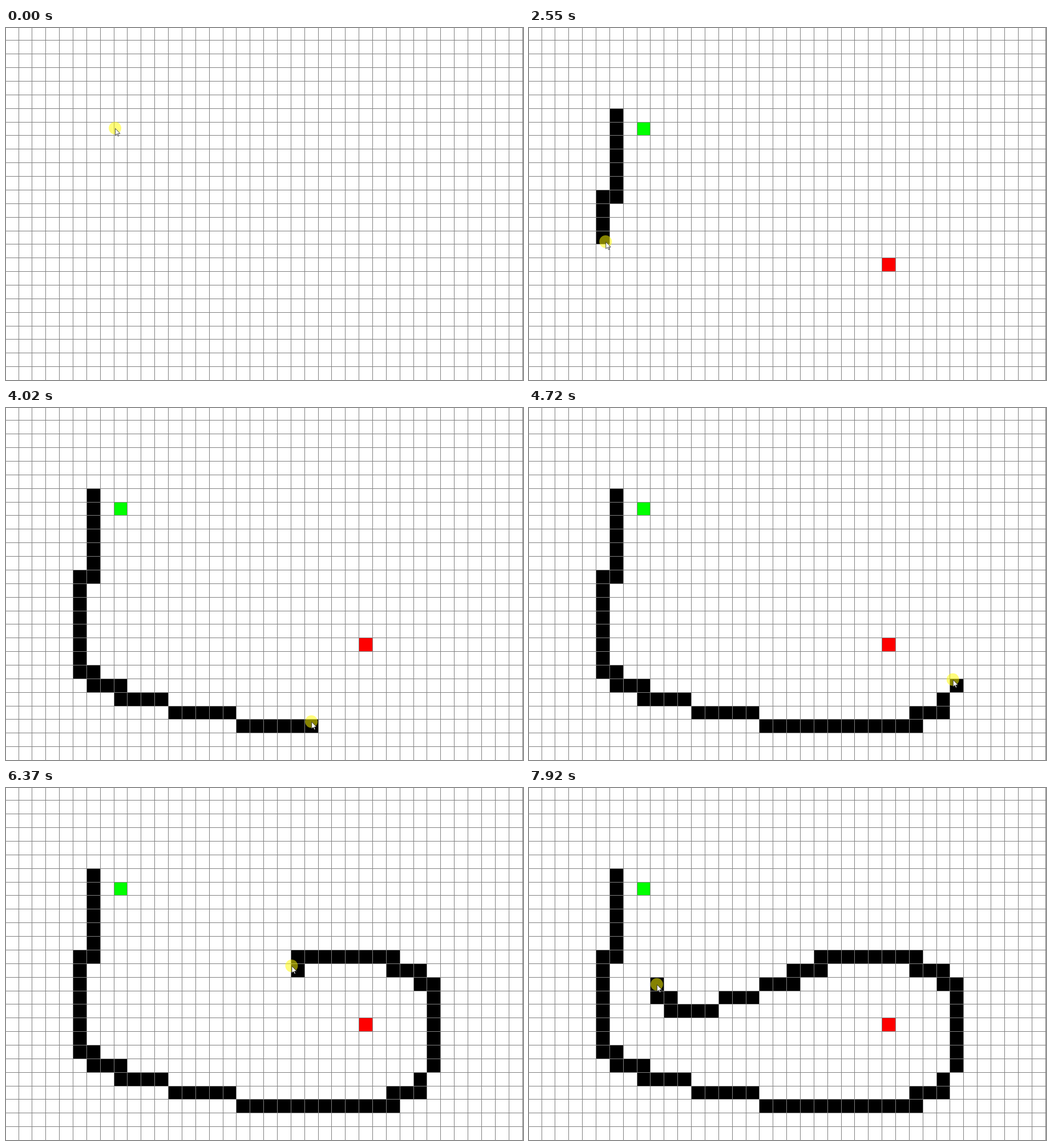
An HTML page with a canvas for the animation above (8000 ms loop, 906x618 px).

```html
<!DOCTYPE html>
<html lang="en">
<head>
<meta charset="utf-8">
<title>Grid walls</title>
<style>
  html, body { margin: 0; width: 100%; height: 100%; overflow: hidden; background: #fff; }
  canvas { display: block; }
</style>
</head>
<body>
<canvas id="stage" width="906" height="618"></canvas>
<script>
const ctx = document.getElementById('stage').getContext('2d');
const W = 906, H = 618, LOOP = 8000;
const PITCH = 23.865, LEFT = 22.05, TOP = 21.9;
const MOVE_AT = 320, STEP_MS = 77.55, GOAL_STEP = 8, DRAG_STEP = 20;

const lineX = k => Math.floor(LEFT + PITCH * k);
const lineY = k => Math.floor(TOP + PITCH * k);

// Pointer path: step, column, row in grid units
const path = [
  [-1, 7.08, 6.45], [8, 25.4, 16.6], [19, 5.36, 5.03],
  [20, 5.2, 5.5], [26, 5, 11.5], [32, 4.4, 18.1], [35, 6.4, 19.55],
  [40, 9.85, 20.6], [41, 11, 21], [44, 16, 22], [52, 27, 22.3],
  [54, 28.9, 21.4], [56, 30, 19.98], [60, 30.8, 16.3], [65, 29.7, 12.95],
  [69, 27.28, 11.73], [76, 21.4, 11.55], [84, 15.98, 14], [88, 13.11, 14.9],
  [89, 12.4, 15.35], [95, 9.7, 15.2], [98, 8.46, 13.53]
];

function pointAt(step) {
  const last = path.length - 1;
  const next = path.findIndex(key => key[0] > step);
  const i = next < 0 ? last : next;
  const [s0, c0, r0] = path[i - 1], [s1, c1, r1] = path[i];
  let p = Math.min(1, (step - s0) / (s1 - s0));
  if (step < DRAG_STEP - 1) p = p * p * (3 - 2 * p); // free moves ease in and out
  return [c0 + (c1 - c0) * p, r0 + (r1 - r0) * p];
}

// Every cell the dragged pointer enters becomes a wall
const walls = new Map();
for (let step = DRAG_STEP; step <= 98; step += 1 / 8) {
  const [col, row] = pointAt(step).map(Math.floor);
  const id = col + ',' + row;
  if (!walls.has(id)) walls.set(id, { col, row, step });
}

function cell(col, row, color) {
  const x = lineX(col), y = lineY(row);
  ctx.fillStyle = color;
  ctx.fillRect(x, y, lineX(col + 1) - x, lineY(row + 1) - y);
}

function grid() {
  ctx.fillStyle = '#808080';
  for (let k = 0; lineX(k) < W; k++) ctx.fillRect(lineX(k), 0, 1, H);
  for (let k = 0; lineY(k) < H; k++) ctx.fillRect(0, lineY(k), W, 1);
}

const arrow = new Path2D('M0 0V12L2.8 9.5L4.7 13.7L6.4 13L4.6 9H8.4Z');

function pointer([col, row], pressed) {
  const x = LEFT + PITCH * col, y = TOP + PITCH * row;
  if (pressed) {
    ctx.fillStyle = 'rgba(255, 250, 0, 0.52)';
    ctx.beginPath();
    ctx.arc(x, y, 11, 0, Math.PI * 2);
    ctx.fill();
  }
  ctx.save();
  ctx.translate(x + 0.5, y + 0.5);
  ctx.fillStyle = '#fff';
  ctx.strokeStyle = '#222';
  ctx.lineWidth = 0.8;
  ctx.fill(arrow);
  ctx.stroke(arrow);
  ctx.restore();
}

function draw(t) {
  const step = t < MOVE_AT ? -1 : Math.floor((t - MOVE_AT) / STEP_MS + 0.4);
  const clicking = t < 150 || step === GOAL_STEP;
  ctx.fillStyle = '#fff';
  ctx.fillRect(0, 0, W, H);
  if (t >= 80) cell(7, 6, '#0f0');
  if (step >= GOAL_STEP) cell(25, 16, '#f00');
  for (const wall of walls.values()) {
    if (wall.step <= step) cell(wall.col, wall.row, '#000');
  }
  grid();
  pointer(pointAt(step), clicking || step >= DRAG_STEP);
}

const start = performance.now();
function tick() {
  draw((performance.now() - start) % LOOP);
  requestAnimationFrame(tick);
}
tick();
</script>
</body>
</html>
```
